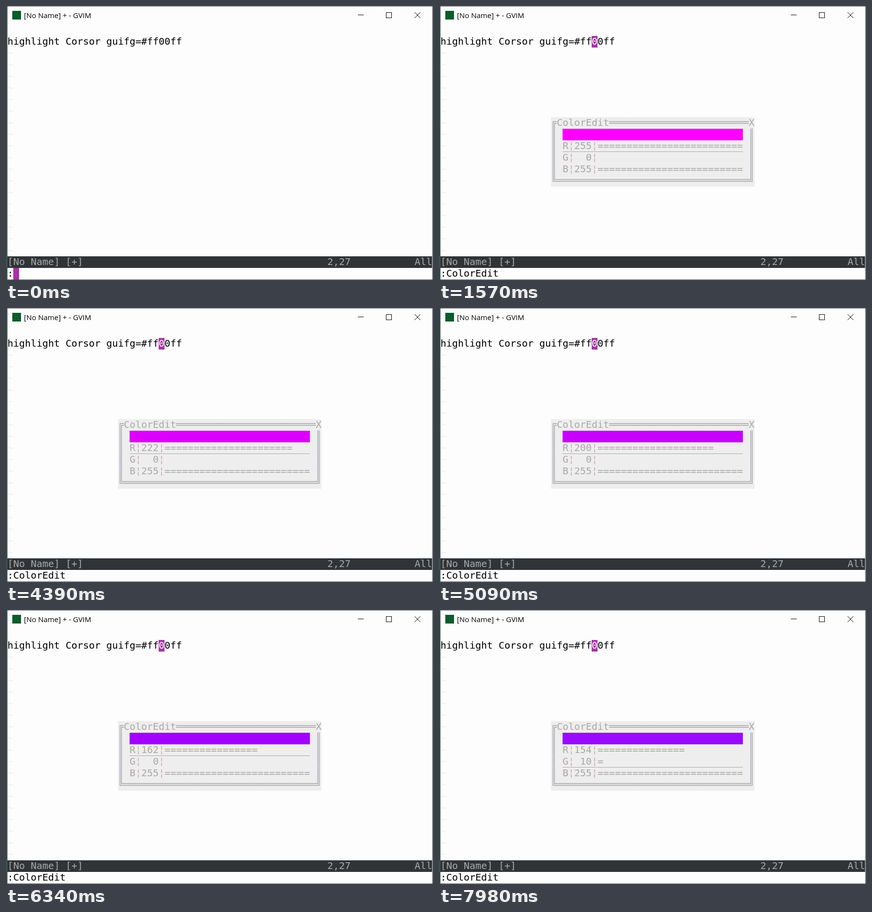
An HTML page with a canvas for the animation above (8 s loop, 881 by 567 pixels).

```html
<!DOCTYPE html>
<html lang="en">
<head>
<meta charset="utf-8">
<title>ColorEdit</title>
<style>
html, body { margin: 0; width: 100%; height: 100%; overflow: hidden; background: #fdfdfd; }
canvas { display: block; }
</style>
</head>
<body>
<canvas id="stage" width="881" height="567"></canvas>
<script>
const ctx = document.getElementById('stage').getContext('2d');
const LOOP = 8000, CELL_W = 12, CELL_H = 24, LEFT = 3, TOP = 62;
const STATUS_ROW = 19, COMMAND_ROW = 20;
const INK = '#000', GREY = '#a8a8a8', PAPER = '#fdfdfd', CURSOR = '#a832a8';

// [time, step] while the key for red is held down; steps between are evenly spaced
const HOLD = [[3410, 0], [3540, 1], [4390, 7], [5090, 12], [5240, 13], [5520, 15],
              [5650, 16], [6340, 21], [6500, 22], [6640, 23]];

function holdStep(t) {
  const i = HOLD.findIndex(([time]) => t < time);
  if (i < 0) return 23;
  if (i === 0) return -1;
  const [t0, k0] = HOLD[i - 1], [t1, k1] = HOLD[i];
  return Math.floor(k0 + (k1 - k0) * (t - t0) / (t1 - t0) + 1e-6);
}

const redAt = t => t < 2960 ? 255 : t < 3410 ? 254 : Math.floor(252 - 4.26 * holdStep(t));
const greenAt = t => t < 7250 ? 0 : t < 7720 ? 1 : t < 7850 ? 2 : t < 7980 ? 6 : 10;

function cursorShown(t) {
  if (t < 3410) return t < 2320 || t >= 2640;
  return holdStep(t) * 140.4 % 650 >= 250;
}

const colX = col => LEFT + col * CELL_W;
const rowY = row => TOP + row * CELL_H;

function rect(x, y, w, h, color) {
  ctx.fillStyle = color;
  ctx.fillRect(x, y, w, h);
}

function print(text, col, row, color) {
  ctx.font = '20px "DejaVu Sans Mono", monospace';
  [...text].forEach((ch, i) => {
    ctx.fillStyle = ch === '¦' ? '#cfabab' : color;
    ctx.fillText(ch, colX(col + i), rowY(row) + 18);
  });
}

function cell(col, row, color) {
  rect(colX(col), rowY(row), CELL_W, CELL_H, color);
}

function drawWindow() {
  rect(0, 0, 881, 567, PAPER);
  rect(13, 10, 18, 18, '#0c5c2c');
  ctx.fillStyle = INK;
  ctx.font = '15px "Open Sans", sans-serif';
  ctx.fillText('[No Name] + - GVIM', 37, 25);

  rect(726, 18, 12, 1, INK);
  ctx.strokeStyle = INK;
  ctx.lineWidth = 1;
  ctx.strokeRect(784.5, 13.5, 11, 11);
  ctx.beginPath();
  ctx.moveTo(843, 13); ctx.lineTo(855, 25);
  ctx.moveTo(855, 13); ctx.lineTo(843, 25);
  ctx.stroke();

  for (let row = 1; row < STATUS_ROW; row++) print('~', 0, row, '#f5e8ea');
  rect(LEFT, rowY(STATUS_ROW), 876, CELL_H, '#303437');
  print('[No Name] [+]', 0, STATUS_ROW, GREY);
  print('2,27', 55, STATUS_ROW, GREY);
  print('All', 70, STATUS_ROW, GREY);

  rect(0, 0, 881, 1, '#5a6464');
  rect(0, 0, 3, 567, '#3c5250');
  rect(879, 1, 1, 566, '#c4c8c8');
  rect(880, 0, 1, 567, '#4c5858');
  rect(0, 566, 881, 1, '#3c4a4a');
}

function drawCommand(t) {
  const typed = t < 620 ? ':' : t < 930 ? ':C' : ':ColorEdit';
  print(typed, 0, COMMAND_ROW, INK);
  if (t < 1570) cell(typed.length, COMMAND_ROW, CURSOR);
}

function drawBuffer(t) {
  print('highlight Corsor guifg=#ff00ff', 0, 0, INK);
  if (t < 1570) return;
  const shown = cursorShown(t);
  cell(26, 0, shown ? CURSOR : PAPER);
  if (shown) print('0', 26, 0, PAPER);
}

function drawPopup(t) {
  const channels = [['R', redAt(t)], ['G', greenAt(t)], ['B', 255]];
  rect(colX(19), rowY(7), 35 * CELL_W, 6 * CELL_H, '#eee');
  print('╔ColorEdit' + '═'.repeat(24) + 'X', 19, 7, GREY);
  for (let row = 8; row < 12; row++) {
    print('║', 19, row, '#a3a8b0');
    print('║', 53, row, '#a3a8b0');
  }
  print('╚' + '═'.repeat(33) + '╝', 19, 12, GREY);
  rect(colX(21), rowY(8), 31 * CELL_W, CELL_H, `rgb(${channels.map(c => c[1])})`);
  channels.forEach(([name, value], i) => {
    const bar = '='.repeat(Math.floor(value / 10));
    print(`${name}¦${String(value).padStart(3)}¦${bar}`, 21, 9 + i, GREY);
  });
  rect(colX(21), rowY(t < 6960 ? 10 : 11) - 1, 31 * CELL_W, 1, GREY);
}

function draw() {
  const t = performance.now() % LOOP;
  drawWindow();
  drawBuffer(t);
  drawCommand(t);
  if (t >= 1570) drawPopup(t);
  requestAnimationFrame(draw);
}
draw();
</script>
</body>
</html>
```
